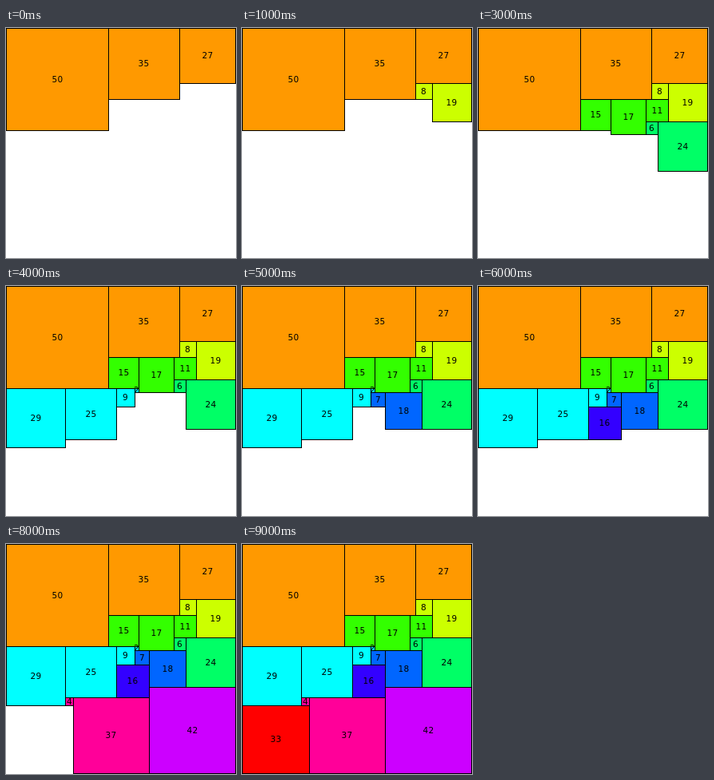
An HTML page for the animation above (10000 ms loop, 288x288 px).

```html
<!DOCTYPE html>
<html lang="en">
<head>
<meta charset="utf-8">
<title>Squared square</title>
<style>
  html, body { margin: 0; width: 100%; height: 100%; overflow: hidden; background: #fff; }
  svg { display: block; width: 288px; height: 288px; }
  rect { stroke: #000; stroke-width: 1; }
  text { font: 10.5px "DejaVu Sans", sans-serif; letter-spacing: .3px; text-anchor: middle; }
</style>
</head>
<body>
<svg id="stage" viewBox="0 0 288 288"></svg>
<script>
const SIDE = 112, SIZE = 287, STEP = 1000;

// Each row of squares fills the highest, leftmost gap left by the rows before it.
const rows = [
  [50, 35, 27], [8, 19], [15, 17, 11], [6, 24], [29, 25, 9, 2],
  [7, 18], [16], [42], [4, 37], [33]
];

const stage = document.getElementById('stage');
const toPixel = units => Math.floor(units * SIZE / SIDE);

function add(parent, tag, attributes = {}) {
  const node = document.createElementNS('http://www.w3.org/2000/svg', tag);
  for (const [name, value] of Object.entries(attributes)) node.setAttribute(name, value);
  return parent.appendChild(node);
}

function drawSquare(group, x, y, side, fill) {
  const left = toPixel(x), top = toPixel(y);
  const width = toPixel(x + side) - left, height = toPixel(y + side) - top;
  add(group, 'rect', { x: left + .5, y: top + .5, width, height, fill });
  add(group, 'text', {
    x: Math.floor(left + width / 2) + .5,
    y: Math.floor(top + height / 2) + 4
  }).textContent = side;
}

const skyline = new Array(SIDE).fill(0);
const groups = rows.map((row, index) => {
  const group = add(stage, 'g');
  const fill = `hsl(${36 * (index + 1) % 360}, 100%, 50%)`;
  const y = Math.min(...skyline);
  let x = skyline.indexOf(y);
  for (const side of row) {
    drawSquare(group, x, y, side, fill);
    skyline.fill(y + side, x, x + side);
    x += side;
  }
  return group;
});

const start = performance.now();
function render(now) {
  const elapsed = Math.max(0, now - start);
  const current = Math.floor(elapsed / STEP) % rows.length;
  groups.forEach((group, index) => {
    group.style.visibility = index <= current ? 'visible' : 'hidden';
  });
  requestAnimationFrame(render);
}
render(start);
</script>
</body>
</html>
```
